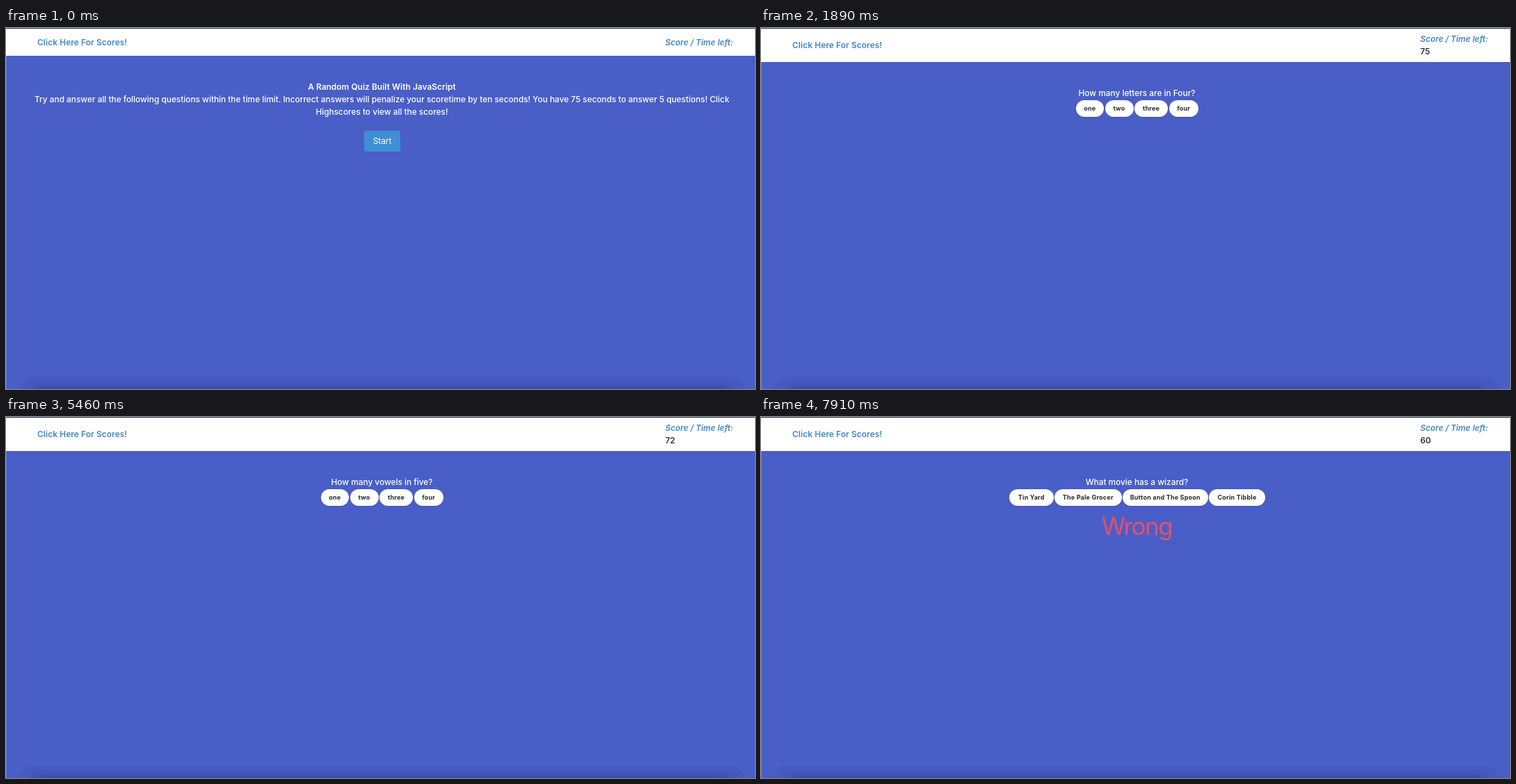
An HTML page that plays this animation: 1077x520 px, repeating every 8000 ms.

```html
<!DOCTYPE html>
<html lang="en">
<head>
<meta charset="utf-8">
<title>Quiz</title>
<style>
  html, body { margin: 0; width: 100%; height: 100%; overflow: hidden; }
  body {
    position: relative; background: #495ec7;
    font: 500 11.85px/18px Inter, "Open Sans", sans-serif; color: #fff;
  }
  body * { position: absolute; box-sizing: border-box; white-space: nowrap; }
  [hidden] { display: none; }
  #edge { left: 0; top: 0; width: 1px; height: 100%; background: #6c7dd2; }
  #bar { left: 0; top: 0; width: 100%; background: #fff; border-top: 1px solid #33364f; }
  #link, #label { color: #4385c4; font-weight: 600; }
  #link { left: 45px; letter-spacing: .11px; }
  #label { left: 948px; font-style: italic; }
  #time { left: 948px; top: 25px; color: #333; font-weight: 600; }
  .mid { left: 2px; width: 1077px; text-align: center; }
  #start {
    left: 515px; top: 148px; width: 52px; height: 30px; border-radius: 3px;
    font-weight: 400; line-height: 30px; text-align: center; background: #3f8fd3;
  }
  #start.hover { background: #2d80c4; }
  .pill {
    top: 104px; height: 24px; border-radius: 12px; background: #fff; color: #2b2b2e;
    font-size: 9px; font-weight: 700; line-height: 24px; letter-spacing: .2px; text-align: center;
    box-shadow: 0 1px 1px rgba(20, 25, 70, .15);
  }
  .pill.hover { box-shadow: 0 1px 1px #23263c; }
  #result { top: 135px; font-size: 35px; font-weight: 400; line-height: 44px; letter-spacing: -1.5px; }
  #dock { left: 0; bottom: 0; width: 100%; height: 20px; overflow: hidden; }
  #dock i { left: 18px; right: 15px; top: 2px; height: 40px; border-radius: 22px; background: rgba(30, 40, 110, .06); }
  #dock b { left: 42px; right: 38px; top: 21px; height: 30px; box-shadow: 0 0 14px rgba(20, 28, 85, .55); }
</style>
</head>
<body>
<div id="edge"></div>
<div id="bar"></div>
<div id="link">Click Here For Scores!</div>
<div id="label">Score / Time left:</div>
<div id="time"></div>

<div id="intro">
  <div class="mid" style="top:76px;font-weight:600;letter-spacing:.07px">A Random Quiz Built With JavaScript</div>
  <div class="mid" style="top:94px">Try and answer all the following questions within the time limit. Incorrect answers will penalize your scoretime by ten seconds! You have 75 seconds to answer 5 questions! Click</div>
  <div class="mid" style="top:112px">Highscores to view all the scores!</div>
  <div id="start">Start</div>
</div>

<div id="quiz">
  <div id="question" class="mid" style="top:85px"></div>
  <div id="pills"></div>
  <div id="result" class="mid"></div>
</div>

<div id="dock"><i></i><b></b></div>

<script>
const LOOP = 8000;
const $ = id => document.getElementById(id);

// Each answer: text, left, width
const numbers = [["one", 452.5, 40.5], ["two", 494.5, 41], ["three", 537, 48], ["four", 586.5, 42.5]];
const movies = [["Tin Yard", 357, 63.5], ["The Pale Grocer", 421.5, 97.5],
  ["Button and The Spoon", 520, 122.5], ["Corin Tibble", 644, 81]];
const questions = [
  ["How many letters are in Four?", numbers],
  ["How many vowels in five?", numbers],
  ["What movie has a wizard?", movies],
];

// Changes of state: [ms, changed fields]
const steps = [
  [0, { screen: -1, time: "", hover: "", result: "" }],
  [980, { hover: "start" }],
  [1890, { screen: 0, time: 75, hover: "" }],
  [2870, { time: 74 }],
  [3150, { hover: "four" }],
  [3430, { screen: 1, hover: "", result: "Correct" }],
  [3920, { time: 73 }],
  [4830, { result: "" }],
  [4970, { time: 72 }],
  [5530, { hover: "three" }],
  [6090, { time: 71 }],
  [6510, { screen: 2, time: 61, hover: "", result: "Wrong" }],
  [7140, { time: 60 }],
];

let shown = -1;

function draw(s) {
  const playing = s.screen >= 0;
  $("bar").style.height = playing ? "49px" : "40px";
  $("link").style.top = playing ? "16px" : "11.5px";
  $("label").style.top = playing ? "7px" : "11.5px";
  $("time").textContent = s.time;
  $("intro").hidden = playing;
  $("quiz").hidden = !playing;
  $("start").classList.toggle("hover", s.hover === "start");
  if (!playing) return;

  const [text, answers] = questions[s.screen];
  $("question").textContent = text;
  $("pills").replaceChildren(...answers.map(([name, x, w]) => {
    const pill = document.createElement("div");
    pill.className = name === s.hover ? "pill hover" : "pill";
    pill.textContent = name;
    pill.style.left = x + "px";
    pill.style.width = w + "px";
    return pill;
  }));
  $("result").textContent = s.result;
  $("result").style.color = s.result === "Wrong" ? "#e2506f" : "#52c896";
}

function tick() {
  const t = performance.now() % LOOP;
  const past = steps.filter(([at]) => at <= t);
  if (past.length !== shown) {
    shown = past.length;
    draw(Object.assign({}, ...past.map(([, change]) => change)));
  }
  requestAnimationFrame(tick);
}
tick();
</script>
</body>
</html>
```
